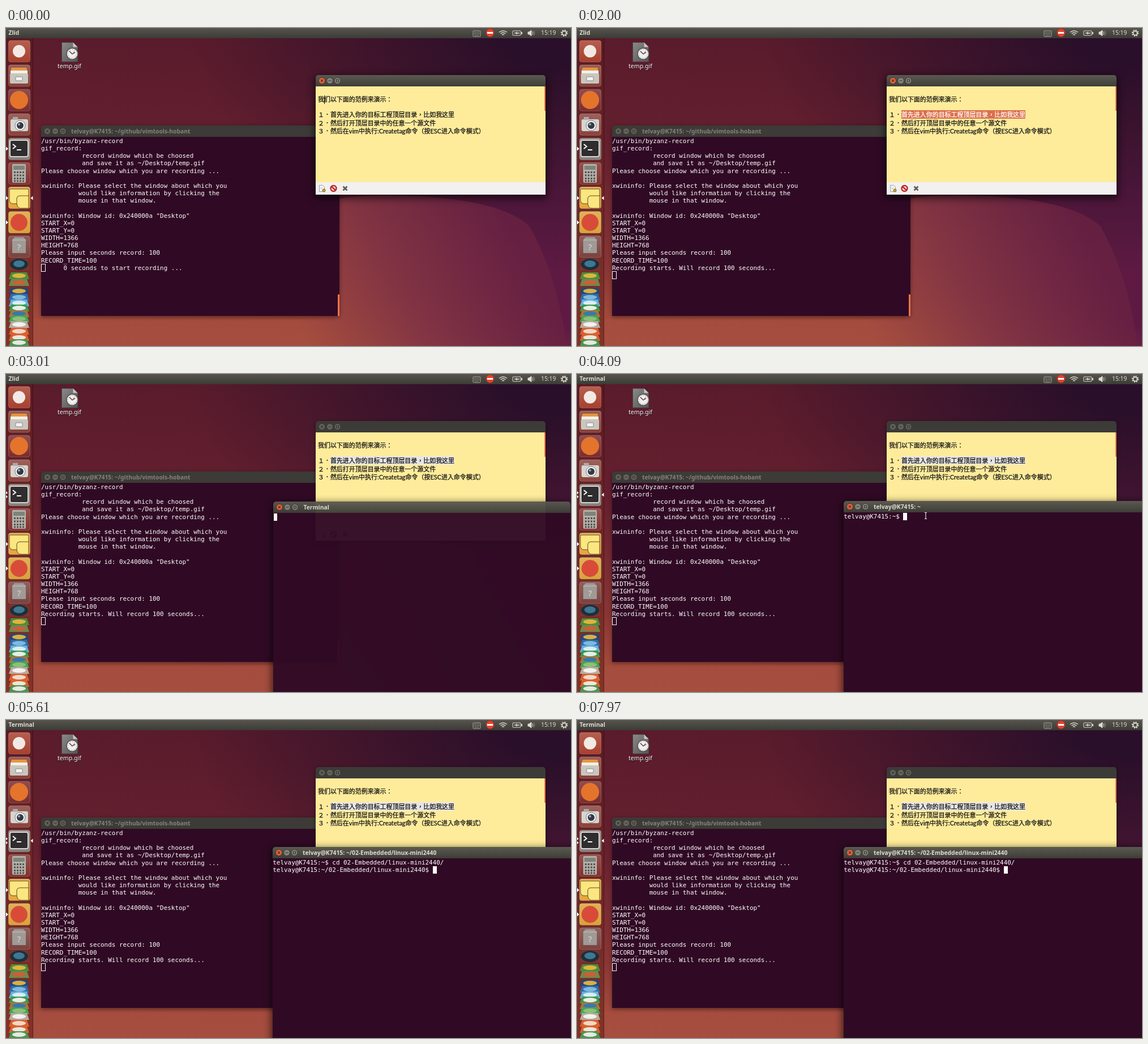
An HTML page that plays this animation: 998 by 561 pixels, repeating every 8 s.

```html
<!DOCTYPE html>
<html lang="zh-TW">
<head>
<meta charset="utf-8">
<title>Desktop</title>
<style>
html, body { margin: 0; width: 100%; height: 100%; overflow: hidden; }
body {
  position: relative;
  font: 10.3px "Noto Sans", "Noto Sans CJK TC", sans-serif;
  background:
    radial-gradient(ellipse 640px 430px at 970px 0, #2a0f2a 15%, #2a0f2a00),
    radial-gradient(ellipse 460px 360px at 1000px 400px, #5e1a42 35%, #5e1a4200),
    linear-gradient(183deg, #561a2b, #66202f 45%, #8a3636 78%, #b0563e);
}
div, svg, pre { position: absolute; margin: 0; }
#art { left: 0; top: 0; }
#panel {
  left: 0; top: 0; width: 100%; height: 18px;
  background: linear-gradient(#56544c, #3c3b37);
  color: #dfdbd2; line-height: 17px;
}
#app { left: 4.5px; font-weight: bold; }
#clock { left: 945px; }
#label { left: 91px; top: 59px; font-size: 10.6px; line-height: 16px; color: #fff; text-shadow: 0 1px 1px #000; }
.win { border-radius: 5px 5px 0 0; box-shadow: 0 2px 7px #0006; }
.win.focus { box-shadow: 0 4px 14px 2px #000a; }
.bar {
  left: 0; top: 0; width: 100%; height: 20px; border-radius: 5px 5px 0 0;
  background: #3c3b37; color: #85827b; --close: #65635b; --btn: #65635b;
}
.focus .bar { background: linear-gradient(#5b5950, #3e3d38); color: #dfdbd2; --close: #ee6238; --btn: #85837a; }
.bar svg { left: 5px; top: 4px; }
.title { left: 53.5px; line-height: 20px; font-weight: bold; white-space: pre; }
.body { left: 0; top: 20px; width: 100%; bottom: 0; background: #300a24; }
pre { font: 10.92px/13.15px "DejaVu Sans Mono", monospace; color: #fff; }
.thumb { right: 0; width: 2.5px; background: #ea7548; }
#shell { left: 61.5px; top: 172px; width: 527px; height: 336px; }
#hollow { left: .5px; width: 6px; height: 11.5px; border: 1px solid #fff; }
#note { left: 547px; top: 83px; width: 406px; height: 211px; }
#note .body { background: #feec9b; }
.line {
  left: 4px; white-space: pre; color: #111;
  font: 10.96px/14.6px Lato, "Noto Sans CJK TC", sans-serif;
  -webkit-text-stroke: .25px;
}
#sel { background: #e7e6e4; padding: 1px 0; }
.focus #sel { background: #dd6f4c; color: #fff; }
#caret { left: 15px; top: 16px; width: 1px; height: 15px; background: #000; }
#foot { left: 0; bottom: 0; width: 100%; height: 22px; background: #f2f1f0; }
#term { left: 470.5px; top: 224px; width: 540px; height: 350px; }
#term.opening { left: 472px; top: 225px; width: 525px; opacity: .96; }
#term.ghost { left: 477px; top: 229px; width: 514.5px; height: 328px; box-shadow: none; }
.ghost .bar { opacity: .85; }
.ghost .title { color: #5c2552; }
.ghost .body { background: #fff8; }
.ghost .body * { visibility: hidden; }
#block { width: 6.6px; height: 13px; background: #fff; }
</style>
</head>
<body>

<svg id="art" width="998" height="561">
  <defs>
    <linearGradient id="page" x2="1" y2="1"><stop stop-color="#8b8989"/><stop offset="1" stop-color="#555"/></linearGradient>
    <linearGradient id="dock" x2="0" y2="1"><stop stop-color="#591a22"/><stop offset="1" stop-color="#823329"/></linearGradient>
    <linearGradient id="gloss" x2="0" y2="1"><stop stop-color="#fff" stop-opacity=".16"/><stop offset="1" stop-color="#fff" stop-opacity="0"/></linearGradient>
    <linearGradient id="glow" gradientUnits="userSpaceOnUse" x1="520" y1="540" x2="900" y2="360">
      <stop stop-color="#a54d3f"/><stop offset=".45" stop-color="#843644"/><stop offset="1" stop-color="#682142"/></linearGradient>
    <symbol id="buttons" viewBox="0 0 42 12">
      <g stroke="#33322e" stroke-width=".8">
        <circle cx="6" cy="6" r="5.5" style="fill:var(--close)"/>
        <circle cx="20" cy="6" r="5.5" style="fill:var(--btn)"/>
        <circle cx="33.5" cy="6" r="5.5" style="fill:var(--btn)"/>
        <path d="M4 4l4 4m0-4l-4 4M17.5 6h5M31.5 4h4v4h-4z" fill="none" stroke-width="1.1"/>
      </g>
    </symbol>
  </defs>

  <path d="M47 514H580V302Q640 293 700 296Q870 300 925 350Q975 440 990 561H47z" fill="url(#glow)" opacity=".85"/>
  <rect y="18" width="47.5" height="543" fill="url(#dock)"/>
  <path d="M47.5 18V561" stroke="#200" stroke-opacity=".5"/>
  <g id="tiles"></g>

  <circle cx="23" cy="41" r="11" fill="#f3e9e4"/>
  <g><rect x="9" y="70" width="28" height="8" rx="2" fill="#e5963f"/><rect x="8" y="75" width="30" height="8" fill="#f2efe8"/>
    <rect x="7" y="80" width="32" height="18" rx="2" fill="#c9c6c0"/><rect x="17" y="86" width="12" height="7" rx="1" fill="#f4f2ee" stroke="#888"/></g>
  <circle cx="23" cy="127" r="16" fill="#e4742c"/>
  <g><rect x="8" y="161" width="31" height="21" rx="3" fill="#d6d4d0"/><rect x="12" y="157" width="9" height="5" fill="#aaa"/>
    <circle cx="25" cy="172" r="9" fill="#f0f0ee" stroke="#777"/><circle cx="25" cy="172" r="6" fill="#333842"/><circle cx="23" cy="170" r="2" fill="#9aa9b8"/></g>
  <g><rect x="7" y="198" width="32" height="29" rx="3" fill="#2f2d2e" stroke="#d8d5d2" stroke-width="2"/>
    <path d="M12 205l5 4-5 4M19 215h8" stroke="#fff" stroke-width="2" fill="none"/></g>
  <g><rect x="11" y="240" width="24" height="33" rx="2" fill="#b3b0aa"/><rect x="13" y="243" width="20" height="7" fill="#7c8478"/>
    <path d="M14 254.500h18M14 260h18M14 265.500h18M14 270h18" stroke="#55524e" stroke-width="3" stroke-dasharray="3 2"/></g>
  <g fill="#fbe680" stroke="#5f4a18"><path d="M6 284h34v34H25q-5-1-6-8H11q-4-1-5-5z"/><path d="M19 310v-10q1-4 5-4h16" fill="none"/></g>
  <circle cx="23" cy="343" r="15" fill="#d94b39"/>
  <g><path d="M11 374l4-5h16l4 5v23H11z" fill="#a09a96"/><path d="M11 374h24" stroke="#c9c4c0"/>
    <text x="23" y="392" font-size="15" text-anchor="middle" fill="#dedad6">?</text></g>
  <g id="stack"></g>
  <g fill="#fff"><path d="M0 296.500l4 3.500-4 3.500zM0 339.500l4 3.500-4 3.500z"/><path id="one" d="M0 209.500l4 3.500-4 3.500z"/>
    <path id="two" d="M0 207l3 2.500-3 2.500zM0 214l3 2.500-3 2.500z"/><path id="active" d="M47.500-3.500L43.500 0l4 3.500z"/></g>

  <path d="M98.500 25.500h20l8 8v26h-28z" fill="url(#page)" stroke="#474546"/>
  <path d="M118.500 25.500v8h8z" fill="#c8c5c3"/>
  <circle cx="117" cy="45.500" r="10" fill="#f1f0ee" stroke="#555" stroke-width="1.500"/>
  <circle cx="117" cy="45.500" r="7.500" fill="none" stroke="#666" stroke-dasharray="1 2.930"/>
  <path d="M112 41l5 5 5-3" fill="none" stroke="#333" stroke-width="1.300"/><path d="M117 46l4-5" stroke="#d33"/>
</svg>

<div id="label">temp.gif</div>
<div id="panel">
  <div id="app"></div><div id="clock">15:19</div>
  <svg width="998" height="18" fill="none" stroke="#dfdbd2">
    <rect x="825" y="5" width="13" height="10" rx="1" stroke="#aaa69e"/>
    <path d="M827 8h10M827 10.500h10M828 13h7" stroke="#aaa69e" stroke-dasharray="1.500 1"/>
    <circle cx="855" cy="8.500" r="7" fill="#e2432d" stroke="#b8301f"/><path d="M850 8.500h10" stroke="#fff" stroke-width="3"/>
    <path d="M871 7.500q7-5 14 0M873.500 10q4.500-3.500 9 0M876 12.300q2-1.500 4 0" stroke-width="1.400"/>
    <rect x="895" y="5" width="14" height="8" rx="1"/><path d="M911 7v4" stroke-width="2"/><path d="M898 9h3l1-2v4l1-2h4" stroke-width="1.300"/>
    <path d="M922 7h2l4-3v10l-4-3h-2z" fill="#dfdbd2"/><path d="M930 6q2 3 0 6" /><path d="M932 4.500q3.500 4.500 0 9" stroke="#8d8a82"/>
    <circle cx="986" cy="9" r="3.600" stroke-width="1.800"/><circle cx="986" cy="9" r="5.300" stroke-width="2" stroke-dasharray="1.900 2.263"/>
  </svg>
</div>

<div id="shell" class="win">
  <div class="bar"><svg width="42" height="12"><use href="#buttons"/></svg><div class="title">telvay@K7415: ~/github/vimtools-hobant</div></div>
  <div class="body"><pre id="log" style="left:.5px;top:1px"></pre><div id="hollow"></div><div class="thumb" style="bottom:0;height:38px"></div></div>
</div>

<div id="note" class="win">
  <div class="bar"><svg width="42" height="12"><use href="#buttons"/></svg></div>
  <div class="body">
    <div class="line" style="top:16.200px">我们以下面的范例来演示：</div>
    <div class="line" style="top:43.200px">１．<span id="sel"></span><span id="rest"></span></div>
    <div class="line" style="top:57.800px">２．然后打开顶层目录中的任意一个源文件</div>
    <div class="line" style="top:72.400px">３．然后在vim中执行:Createtag命令（按ESC进入命令模式）</div>
    <div id="caret"></div>
    <div class="thumb" style="top:0;height:43px"></div>
    <div id="foot"><svg width="70" height="22">
      <path d="M6.500 5.500h6l3 3v8h-9z" fill="#fff" stroke="#999"/><path d="M8 9h5M8 11.500h4" stroke="#bbb"/><circle cx="14.500" cy="14.500" r="2.500" fill="#d8a823" stroke="#665a25"/>
      <circle cx="31.500" cy="11" r="5" fill="#eee" stroke="#bd2a25" stroke-width="2.400"/><path d="M28 8l7 6" stroke="#bd2a25" stroke-width="2.400"/>
      <path d="M48.500 7.500l7 7m0-7l-7 7" stroke="#5c5c5a" stroke-width="2.600"/>
    </svg></div>
  </div>
</div>

<div id="term" class="win focus">
  <div class="bar"><svg width="42" height="12"><use href="#buttons"/></svg><div class="title" id="termTitle"></div></div>
  <div class="body"><pre id="out" style="left:.8px;top:1px"></pre><div id="block"></div></div>
</div>

<svg id="mouse" width="6" height="12" fill="none"><path d="M1 .5h1.500l.5.800.5-.8H5M3 1v10M1 11.500h1.500l.5-.8.5.8H5"/></svg>

<script>
const $ = id => document.getElementById(id);
const LOOP = 8000, CELL = 6.574, ROW = 13.15;
const HOST = 'telvay@K7415', DIR = '02-Embedded/linux-mini2440';
const PROMPT = HOST + ':~$ ', COMMAND = 'cd ' + DIR + '/';
const CHOSEN = '首先进入你的目标工程顶层目录，比如我这里';
const LOG = `/usr/bin/byzanz-record
gif_record:
           record window which be choosed
           and save it as ~/Desktop/temp.gif
Please choose window which you are recording ...

xwininfo: Please select the window about which you
          would like information by clicking the
          mouse in that window.

xwininfo: Window id: 0x240000a "Desktop"
START_X=0
START_Y=0
WIDTH=1366
HEIGHT=768
Please input seconds record: 100
RECORD_TIME=100
`;

// [time, characters of the command on screen]
const KEYS = [[4130, 1], [4180, 2], [4350, 3], [4810, 4], [4870, 5], [5030, 15], [5130, 16], [5320, 17], [5390, 30]];
const BLINKS = [[3490, 4090], [6140, 6740], [7340, 7940]];
const MOVES = [
  { from: 3200, to: 3860, hide: 4130, points: [[618, 221], [640, 267], [616, 250]] },
  { from: 7380, to: 7970, hide: LOOP, points: [[616, 250], [590, 222], [619, 185]] }
];

const tileColors = ['#a8402f', '#8a3f35', '#7a2c2f', '#8c433c', '#85807e', '#84302f', '#e7a53c', '#d9a437', '#7a423f'];
$('tiles').innerHTML = tileColors.map((c, i) => {
  const box = `x="4.500" y="${22 + i * 43.1}" width="38" height="38" rx="4"`;
  return `<rect ${box} fill="${c}"/><rect ${box} fill="url(#gloss)" stroke="#fff" stroke-opacity=".2"/>`;
}).join('');

// launcher icons folded flat: [y, tile, icon]
const folded = [[436, '#4b8c3f', '#dcb53c'], [448, '#6d8a4a', '#c8603a'], [463, '#27457a', '#d9b040'], [474, '#2f6cab', '#7fb9dc'],
  [484, '#62b2df', '#dcecf2'], [493, '#3b9b4d', '#e6efe6'], [503, '#a8763d', '#3b76ad'], [512, '#4aa452', '#8cc078'],
  [522, '#b9aba3', '#f2f1ee'], [534, '#d9602f', '#f0d9c8'], [545, '#d9622f', '#f0e4da'], [554, '#4c9450', '#e6e8e2']];
$('stack').innerHTML = '<path d="M8 407h30l4 20H5z" fill="#7b3430"/>' +
  '<ellipse cx="23" cy="417" rx="16" ry="10" fill="#1d2f3b"/><ellipse cx="23" cy="416" rx="10" ry="6" fill="#3d7892"/>' +
  folded.map(([y, a, b]) => `<path d="M9 ${y - 5}h28l4 12H5z" fill="${a}"/>` +
    `<ellipse cx="23" cy="${y + 1}" rx="12" ry="4" fill="${b}"/>`).join('');

function selected(t) {
  if (t < 930) return 0;
  if (t < 1740) return Math.min(17, 1 + Math.floor(16 * (t - 930) / 760));
  return t < 1850 ? 18 : t < 2000 ? 19 : 20;
}

function along(points, u) {
  const s = Math.max(0, Math.min(1, u)) * (points.length - 1);
  const i = Math.min(points.length - 2, Math.floor(s));
  return points[i].map((v, k) => v + (points[i + 1][k] - v) * (s - i));
}

const show = (id, on) => { $(id).style.visibility = on ? '' : 'hidden'; };

function drawDesktop(t) {
  const recording = t >= 60, opened = t >= 3060;
  $('log').textContent = LOG + (recording ? 'Recording starts. Will record 100 seconds...' : '      0 seconds to start recording ...');
  $('hollow').style.top = .5 + ROW * (recording ? 18 : 17) + 'px';
  $('app').textContent = opened ? 'Terminal' : 'Zlid';
  $('note').classList.toggle('focus', t < 2960);
  show('caret', t < 740);
  const n = selected(t);
  $('sel').textContent = CHOSEN.slice(0, n);
  $('rest').textContent = CHOSEN.slice(n);
  show('one', t < 3010);
  show('two', t >= 3010);
  show('active', t < 3010 || opened);
  $('active').setAttribute('transform', `translate(0 ${opened ? 213 : 300})`);
}

function drawTerminal(t) {
  const term = $('term');
  term.style.display = t < 2960 ? 'none' : '';
  term.className = 'win focus' + (t < 3010 ? ' ghost' : t < 3060 ? ' opening' : '');
  $('termTitle').textContent = t < 3060 ? 'Terminal' : HOST + ': ~' + (t < 5610 ? '' : '/' + DIR);

  const typed = KEYS.reduce((n, [at, len]) => t >= at ? len : n, 0);
  let text = t < 3060 ? '' : PROMPT + COMMAND.slice(0, typed);
  if (t >= 5560) text += '\n';
  if (t >= 5610) text += HOST + ':~/' + DIR + '$ ';
  $('out').textContent = text;

  const rows = text.split('\n');
  $('block').style.left = .8 + rows.at(-1).length * CELL + 'px';
  $('block').style.top = 1 + (rows.length - 1) * ROW + 'px';
  show('block', !BLINKS.some(([off, on]) => t >= off && t < on));
}

function drawMouse(t) {
  const move = MOVES.find(m => t >= m.from && t < m.hide);
  show('mouse', move);
  if (!move) return;
  const [x, y] = along(move.points, (t - move.from) / (move.to - move.from));
  const mouse = $('mouse');
  mouse.style.left = x - 3 + 'px';
  mouse.style.top = y - 6 + 'px';
  mouse.style.stroke = y < 224 ? '#222' : '#fff';
}

function frame(now) {
  const t = now % LOOP;
  drawDesktop(t);
  drawTerminal(t);
  drawMouse(t);
}

let start;
function tick(now) {
  start ??= now;
  frame(now - start);
  requestAnimationFrame(tick);
}
frame(0);
requestAnimationFrame(tick);
</script>
</body>
</html>
```
